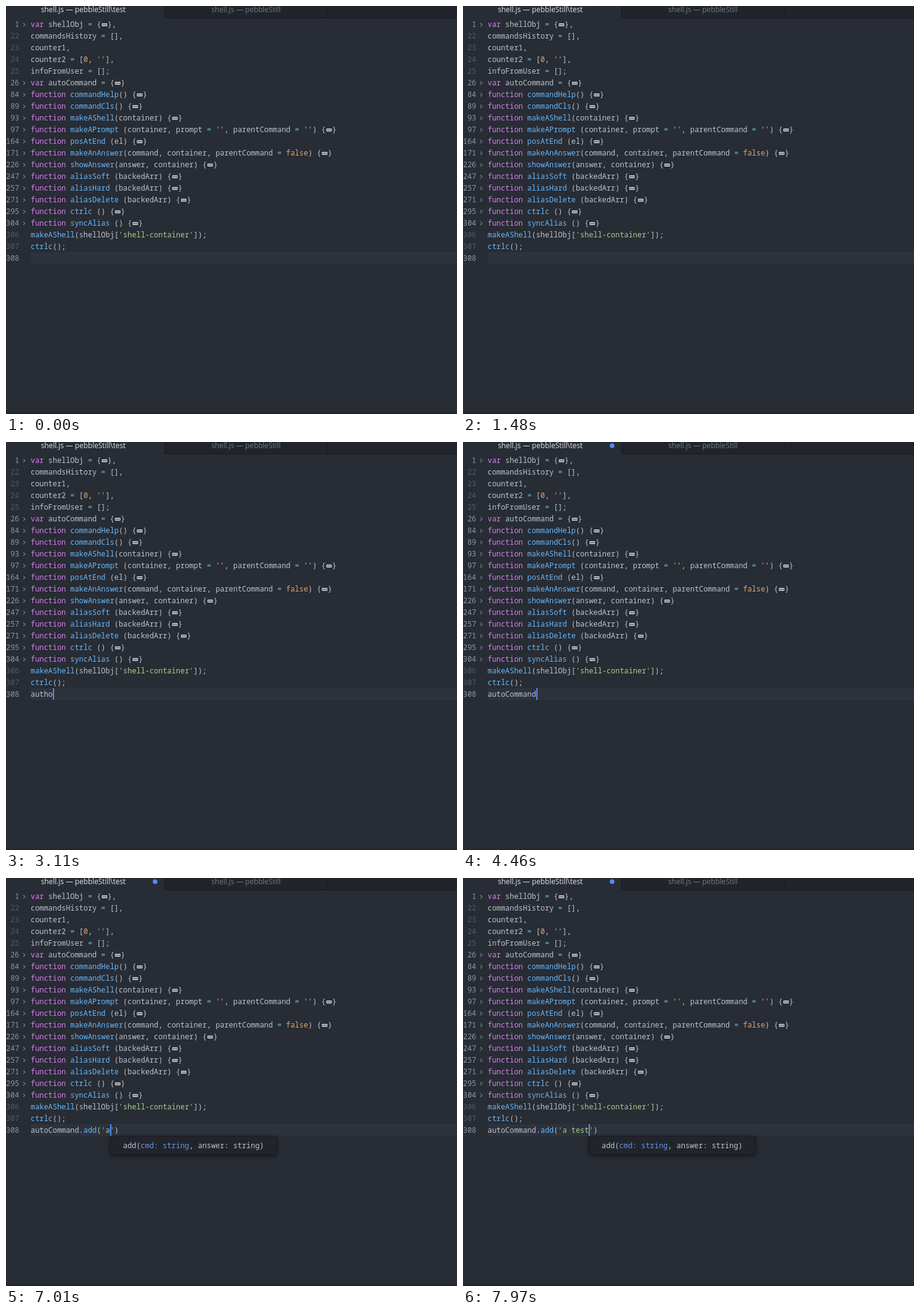
Animation, 732 px wide and 663 px high, one loop 8 s. Source, as an HTML page with a canvas:

```html
<!DOCTYPE html>
<html lang="en">
<head>
<meta charset="utf-8">
<title>Code editor with autocomplete</title>
<style>
  html, body { margin: 0; width: 100%; height: 100%; overflow: hidden; background: #282c34; }
  canvas { display: block; }
</style>
</head>
<body>
<canvas id="stage" width="732" height="663"></canvas>
<script>
const ctx = document.getElementById('stage').getContext('2d');
const LOOP = 8000, LEFT = 40, ROW = 19, FONT = 11.912, CELL = FONT * 0.6;
const MONO = '"Noto Sans Mono", monospace', SANS = '"Open Sans", sans-serif';
const C = {
  bg: '#282c34', panel: '#21252b', edge: '#181a1f', text: '#bcc3d0', dim: '#737a87',
  keyword: '#d480ec', call: '#66b8fb', string: '#a6cf88', value: '#dfa46c',
  operator: '#5cc0cc', property: '#ec6f79', accent: '#568af2'
};

const LINES = [
  [1, 'var shellObj = {…},'],
  [22, 'commandsHistory = [],'],
  [23, 'counter1,'],
  [24, "counter2 = [0, ''],"],
  [25, 'infoFromUser = [];'],
  [26, 'var autoCommand = {…}'],
  [84, 'function commandHelp() {…}'],
  [89, 'function commandCls() {…}'],
  [93, 'function makeAShell(container) {…}'],
  [97, "function makeAPrompt (container, prompt = '', parentCommand = '') {…}"],
  [164, 'function posAtEnd (el) {…}'],
  [171, 'function makeAnAnswer(command, container, parentCommand = false) {…}'],
  [226, 'function showAnswer(answer, container) {…}'],
  [247, 'function aliasSoft (backedArr) {…}'],
  [257, 'function aliasHard (backedArr) {…}'],
  [271, 'function aliasDelete (backedArr) {…}'],
  [295, 'function ctrlc () {…}'],
  [304, 'function syncAlias () {…}'],
  [306, "makeAShell(shellObj['shell-container']);"],
  [307, 'ctrlc();'],
  [308, '']
];

// Text of the last line over time; | is a visible caret, ¦ a blinked-off one.
const TYPING = [
  [0, '¦'], [1510, '|'], [1890, 'a|'], [2050, 'au|'], [2370, 'aut|'], [2490, 'auth|'],
  [2670, 'autho|'], [2850, 'author|'], [3110, 'autho|'], [3300, 'auth|'], [3440, 'aut|'],
  [3670, 'auto|'], [4060, 'auto¦'], [4460, 'autoCommand|'], [4750, 'autoCommand.|'],
  [5060, 'autoCommand.¦'], [5280, 'autoCommand.a|'], [5570, 'autoCommand.ad|'],
  [5730, 'autoCommand.add|'], [6030, 'autoCommand.add(|)'], [6440, 'autoCommand.add(¦)'],
  [6700, "autoCommand.add('|')"], [7010, "autoCommand.add('a|')"],
  [7270, "autoCommand.add('a |')"], [7400, "autoCommand.add('a t|')"],
  [7580, "autoCommand.add('a te|')"], [7820, "autoCommand.add('a tes|')"],
  [7970, "autoCommand.add('a test|')"]
];

// Suggestion rows: kind, left label, word, right label.
const ADD = [['f', '', 'add()'], ['s', '', 'add(cmd: string, answer: string)']];
const ARROW = ['s', '', 'af', 'Arrow Function'];
const GLOBALS = [
  ARROW, ['v', '', 'autoCommand'],
  ['f', '', 'aliasSoft()'], ['s', '', 'aliasSoft(backedArr)'],
  ['f', '', 'aliasHard()'], ['s', '', 'aliasHard(backedArr)'],
  ['f', '', 'aliasDelete()'], ['s', '', 'aliasDelete(backedArr)'],
  ['f', '', 'alert()'], ['v', 'string', 'answer']
];
const VARIABLE = [['v', '', 'autoCommand']];
const MEMBERS = [
  ['p', '?', 'a'], ...ADD,
  ['f', 'bool', 'hasOwnProperty()'], ['s', 'bool', 'hasOwnProperty(prop: string)'],
  ['f', 'bool', 'isPrototypeOf()'], ['s', 'bool', 'isPrototypeOf(obj: ?)'],
  ['f', 'bool', 'propertyIsEnumerable()'],
  ['s', 'bool', 'propertyIsEnumerable(prop: string)'], ['f', 'string', 'toString()']
];
const WORDS = [['s', '', 'timeout', 'setTimeout'], ['s', '', 'typeof'], ['s', '', 'template']];

// Start, rows, column of the word, matched length, width.
const POPUPS = [
  [0], [1940, GLOBALS, 0, 1, 546], [2110, VARIABLE, 0, 2, 243], [2530],
  [3710, VARIABLE, 0, 4, 243], [4460], [4880, MEMBERS, 12, 0, 340],
  [5340, [ARROW, ['p', '?', 'a'], ...ADD], 12, 1, 400],
  [5610, ADD, 12, 2, 276], [5770, ADD, 12, 3, 276], [6110],
  [7070, GLOBALS, 17, 1, 546], [7270], [7640, WORDS, 19, 1, 240], [7870]
];
const KINDS = {
  s: ['#3d4a41', C.string], p: ['#3b4049', C.text], f: ['#2c4058', C.call], v: ['#463a50', C.keyword]
};

const latest = (list, t) => list.findLast(item => item[0] <= t);

function rect(x, y, w, h, color) {
  ctx.fillStyle = color;
  ctx.fillRect(x, y, w, h);
}

function circle(x, y, r, color) {
  ctx.fillStyle = color;
  ctx.beginPath();
  ctx.arc(x, y, r, 0, 7);
  ctx.fill();
}

function sans(text, x, y, color = '#fff', size = 11.6, align = 'left') {
  ctx.font = `${size}px ${SANS}`;
  ctx.textAlign = align;
  ctx.fillStyle = color;
  ctx.fillText(text, x, y);
}

// Draws on a character grid and returns the x after the last cell.
function mono(text, x, y, color, size = FONT, weight = 500) {
  ctx.font = `${weight} ${size}px ${MONO}`;
  ctx.textAlign = 'left';
  ctx.fillStyle = color;
  for (const char of text) {
    ctx.fillText(char, x, y);
    x += size * 0.6;
  }
  return x;
}

function foldMark(x, y) {
  ctx.fillStyle = C.text;
  ctx.beginPath();
  ctx.roundRect(x + 1, y - 6, 9, 5, 1);
  ctx.fill();
  for (let i = 0; i < 3; i++) rect(x + 2.5 + i * 2.4, y - 4.3, 1.4, 1.6, C.bg);
  return x + 10.5;
}

function code(text, y) {
  const token = /(function|var)\b|('[^']*')|(\b\d+\b|false\b)|(\w+(?=\s*\())|((?<=\.)\w+)|(=)|(\w+|.)/g;
  const colors = [C.keyword, C.string, C.value, C.call, C.property, C.operator, C.text];
  let x = LEFT;
  for (const match of text.matchAll(token)) {
    const kind = match.slice(1).findIndex(Boolean);
    x = match[0] === '…' ? foldMark(x, y) : mono(match[0], x, y, colors[kind]);
  }
}

function editor() {
  rect(0, 0, 732, 663, C.bg);
  rect(257, 0, 475, 20, C.panel);
  rect(257, 19, 475, 1, C.edge);
  rect(257, 0, 1, 20, C.edge);
  rect(521, 0, 1, 20, C.edge);
  sans('shell.js — pebbleStill\\test', 125.5, 10, '#e2e5ea', 11.8, 'center');
  sans('shell.js — pebbleStill', 389.5, 10, C.dim, 11.8, 'center');
  rect(LEFT, 400, 692, ROW, '#2d323c');
  LINES.forEach(([number, text], i) => {
    const y = 34 + i * ROW, folded = text.includes('…');
    const bright = folded || number === 308;
    mono(`${number}`, 21.5 - `${number}`.length * CELL, y, bright ? '#8f96a3' : '#515969');
    if (folded) {
      ctx.strokeStyle = C.dim;
      ctx.lineWidth = 1.2;
      ctx.beginPath();
      ctx.moveTo(28, y - 6.5);
      ctx.lineTo(31, y - 3.8);
      ctx.lineTo(28, y - 1);
      ctx.stroke();
    }
    code(text, y);
  });
}

function panel(x, y, w, h) {
  ctx.save();
  ctx.shadowColor = 'rgba(0,0,0,.45)';
  ctx.shadowBlur = 6;
  ctx.shadowOffsetY = 2;
  ctx.fillStyle = C.panel;
  ctx.beginPath();
  ctx.roundRect(x, y, w, h, 3);
  ctx.fill();
  ctx.restore();
}

function kindIcon(kind, x, y) {
  const [back, front] = KINDS[kind];
  rect(x, y, 26, 26, back);
  if (kind !== 's') return mono(kind, x + 9.5, y + 17, front, FONT, 700);
  rect(x + 6.5, y + 11.5, 5, 3, front);
  ctx.beginPath();
  ctx.moveTo(x + 11, y + 8.5);
  ctx.lineTo(x + 16, y + 13);
  ctx.lineTo(x + 11, y + 17.5);
  ctx.fill();
  rect(x + 17, y + 9, 2, 8, front);
}

function popup(rows, column, matched, width) {
  const small = 11, labelSize = Math.max(...rows.map(row => row[1].length));
  const wordX = Math.max(LEFT + column * CELL, labelSize > 5 ? 80 : 0);
  const x = Math.round(wordX - 36 - (labelSize ? labelSize * small * 0.6 + 9.4 : 0));
  panel(x, 419, width, rows.length * 26);
  rows.forEach(([kind, label, word, right], i) => {
    const y = 419 + i * 26, base = y + 17;
    if (!i) rect(x, y, width, 26, '#3a3f4b');
    kindIcon(kind, x, y);
    mono(label, wordX - 7.5 - label.length * small * 0.6, base, C.dim, small);
    const open = word.indexOf('(');
    [...word].forEach((char, k) => {
      const hit = k < matched;
      const hint = open >= 0 && k > open && !'(),'.includes(char);
      const color = hit ? '#fff' : hint ? C.dim : i ? C.text : '#d7dae0';
      mono(char, wordX + k * CELL, base, color, FONT, hit ? 700 : 500);
    });
    if (right) mono(right, x + width - 12 - right.length * small * 0.6, base, '#9199a7', small);
  });
}

function tooltip(caretX) {
  const x = Math.round(caretX);
  panel(x, 419, 271, 31);
  ctx.strokeStyle = C.edge;
  ctx.lineWidth = 1;
  ctx.beginPath();
  ctx.roundRect(x + 0.5, 419.5, 270, 30, 3);
  ctx.stroke();
  let end = mono('add(', x + 21, 439, C.text);
  end = mono('cmd: string', end, 439, '#6494ed');
  mono(', answer: string)', end, 439, C.text);
}

function inside(x, y, w, h, draw) {
  ctx.save();
  ctx.beginPath();
  ctx.rect(x, y, w, h);
  ctx.clip();
  draw();
  ctx.restore();
}

const list = (items, x, y, step, color, size = 3.6) =>
  items.forEach((item, i) => sans(item, x, y + i * step, color, size));

function recorderWindow() {
  rect(214, 108, 24, 16, '#d5d8da');
  sans('PanelToClip', 243, 122);
  rect(214, 133, 194, 8, '#fff');
  rect(214, 313, 194, 9, '#f4f4f4');
  rect(214, 141, 1, 172, '#fff');
  rect(407, 141, 1, 172, '#fff');
  sans('PanelToClip  rec', 217, 139, '#444', 4);
  sans('×', 401, 139, '#555', 4);
  for (let i = 0; i < 9; i++) rect(308 + i * 8, 316, 4, 3, '#b5b5b5');
  rect(379, 316, 4, 4, '#2a6fc0');
  rect(394, 316, 4, 4, '#2b4f8c');
  sans('Pause', 384, 320, '#333', 3.6);
  sans('Stop', 399, 320, '#333', 3.6);
}

function editorWindow() {
  ctx.strokeStyle = '#fff';
  ctx.lineWidth = 2;
  ctx.strokeRect(415, 100, 330, 228);
  circle(432, 117, 12, '#35a878');
  sans('shell.js — pebbleStill\\test — C:\\Users\\parvin tolmaner...', 449, 122);
  inside(420, 133, 312, 194, () => {
    rect(420, 133, 312, 194, C.bg);
    rect(420, 139, 312, 10, C.panel);
    ctx.save();
    ctx.translate(422, 143.5);
    ctx.scale(0.255, 0.255);
    editor();
    ctx.restore();
    rect(420, 133, 312, 8, '#fff');
    sans('File  Edit  View  Selection  Find  Packages  Help', 422, 139, '#555', 3.6);
    rect(420, 315, 312, 9, C.panel);
    sans('+  ▢  ×   shell.js   308:1', 423, 321, '#9da5b4', 3.6);
    sans('CRLF   UTF-8   JavaScript   ⎇ master   0 files', 652, 321, '#9da5b4', 3.6);
  });
}

function filesWindow() {
  rect(135, 342, 12, 19, '#f3d58a');
  rect(138, 345, 10, 15, '#f8e3a8');
  sans('PanelToClip.1.20.4.Portable', 160, 356);
  rect(131, 367, 356, 190, '#fff');
  rect(131, 379, 356, 24, '#f5f6f7');
  rect(131, 373, 15, 6, '#1979ca');
  rect(190, 367, 31, 6, '#f4d4e4');
  sans('File', 134, 378, '#fff', 4);
  sans('Home     Share     View     Application Tools', 149, 378, '#444', 4);
  const tools = ['#b9c3cb', '#bfcbd6', '#a9c4e0', '#f1cf77', '#f1cf77', '#222', '#d5b15b', '#f4d98b', '#8fb3dc', '#92bce6'];
  tools.forEach((color, i) => rect(139 + i * 17 + (i > 2 ? 15 : 0), 382, 5, 7, color));
  list(['Pin  Copy Paste', 'access'], 137, 394, 4, '#555');
  list(['Move  Copy  Delete Rename', 'to       to'], 202, 394, 4, '#555');
  list(['New item', 'Easy access'], 262, 385, 5, '#555');
  list(['Open', 'Edit', 'History'], 309, 385, 5, '#555');
  list(['Select all', 'Select none', 'Invert'], 335, 385, 5, '#555');
  sans('←  →  ↑   › This PC › Downloads › PanelToClip.1.20.4.Portable', 135, 409, '#444', 4);
  rect(131, 411, 356, 1, '#e5e5e5');
  sans('Name                                                    Date modified              Type                          Size', 191, 417, '#555', 4);
  rect(184, 420, 163, 6, '#d6d6d6');
  sans('PanelToClip.exe', 191, 425, '#222', 4);
  sans('11/20/2019  6:02 PM      Application         1,740 KB', 252, 425, '#777', 4);
  rect(131, 514, 48, 6, '#d6d6d6');
  const places = ['Quick access', 'Desktop', 'Downloads', 'Documents', 'Pictures', 'design_notes',
    'formplanner', 'Folding Stone Paper', 'quiz-content', '', '', 'Cloud', 'This PC', '3D Objects',
    'Desktop', 'Documents', 'Downloads', 'Music', 'Pictures', 'Videos', 'Local Disk (C:)', 'Data Disk (D:)'];
  places.forEach((place, i) => {
    if (place) rect(138, 418 + i * 6.05, 4, 3.5, i > 4 && i < 9 ? '#f0cc6c' : '#58a2dc');
    sans(place, 145, 421.7 + i * 6.05, '#333', 3.8);
  });
  rect(178, 412, 5, 140, '#eee');
  rect(408, 412, 1, 140, '#eee');
  sans('No preview available.', 436, 484, '#666', 4);
  sans('1 item     1 item selected  1.70 MB', 135, 556, '#444', 3.8);
  rect(475, 552, 5, 5, '#8bc8be');
}

function projectWindow() {
  circle(511, 351, 12, '#35a878');
  sans('shell.js — C:\\Users\\parvin tolmaneri\\I...', 528, 356);
  inside(499, 367, 233, 190, () => {
    rect(499, 367, 233, 190, C.bg);
    rect(499, 367, 233, 6, '#fff');
    sans('File  Edit  View  Selection  Find  Packages  Help', 503, 372, '#555', 3.6);
    rect(499, 373, 59, 184, C.panel);
    rect(558, 373, 174, 8, C.panel);
    rect(722, 373, 10, 8, C.bg);
    rect(499, 530, 56, 6, '#3a3f4b');
    sans('Project', 522, 379, '#9da5b4', 3.8);
    sans('shell.js', 638, 379, '#9da5b4', 3.8);
    list(['⌄ images', '   alias.png', '   bigger.png', '   clear.png', '   close.png', '   delete.png', '   errors.png',
      '   open.png', '   help.png', '   move.png', '   save.png', '   sync.png', '   zoom.png', '› node_modules',
      '.gitignore', 'help.js', 'index.css', 'index.html', 'index.js', 'LICENSE', 'package-lock.json', 'package.json',
      'README.md', 'server.js', 'shell.js', 'shell-data.json', 'shell-style.css'], 508, 385, 6.1, '#9da5b4');
    const commands = ["'prompt-error-color': 'yellow',", "'command': {", "  'alias -soft': ['aliasSoft', 'prompt', ['command', 'alias']],",
      "  'alias -hard': ['aliasHard', 'prompt', ['command', 'alias', 'arguments']],", "  'alias -delete': ['aliasDelete', 'prompt', ['alias']],",
      "  'cancelCommand': ['cancelled', []],", "  'change bg': ['bgChange', 'prompt', ['color', 'success message']],", "  'cls': ['commandCls', ''],",
      "  'clear': ['commandCls', ''],", "  'config manifest -open': ['configOpen', ''],", "  'config manifest -reload': ['configReload', ''],",
      "  'config manifest -set': ['configSet', 'prompt', ['json file name']],", "  'convert': ['convert', 'prompt', ['from', 'json file name']],",
      "  'create': ['create', 'prompt', ['sort_number', 'type']],", "  'delete': ['cls_delete', 'prompt', ['delete by sort number']],",
      "  'hello': ['Hi', ''],", "  'clicked to refresh a content': ['Content refreshed', ''],", "  'help': ['commandHelp', ''],",
      "  'help --list': ['commandHelp', 'list'],", "  'longtext': ['Lorem ipsum dolor sit amet, consectetur adipiscing'],",
      "  'make page from folder': ['makePageFromFolder', ''],", "  'set folder to save your file': ['setFolder']", '}', '},',
      'commandsHistory = [],', 'counter1,', "counter2 = [0, ''],", 'infoFromUser = [];', '', '', 'var autoCommand = {', '  trie: {', '    nodes: [],'];
    commands.forEach((line, i) => {
      const y = 385.5 + i * 4.95;
      mono(`${i + 3}`, 561, y, '#4b5363', 3.3);
      mono(line, i < 23 ? 576 : 569, y, i < 22 ? C.string : C.text, 3.3);
    });
    rect(499, 550, 233, 7, C.panel);
    sans('+   ▢   ×   shell.js   22:1', 502, 555, '#9da5b4', 3.6);
  });
}

function switcher(alpha) {
  // Layers fade one by one with the same alpha.
  ctx.save();
  ctx.globalAlpha = alpha;
  rect(104, 76, 628, 508, 'rgba(24,24,24,.86)');
  recorderWindow();
  editorWindow();
  filesWindow();
  projectWindow();
  ctx.restore();
}

function draw(t) {
  editor();
  rect(0, 661, 732, 2, C.panel);

  const line = latest(TYPING, t)[1];
  const caret = line.search(/[|¦]/);
  const caretX = LEFT + caret * CELL;
  code(line.replace(/[|¦]/, ''), 414);
  if (t >= 6030 && t < 6700) rect(LEFT + 15 * CELL, 417, CELL * 2, 1, '#528bff');
  if (line.includes('|')) rect(Math.round(caretX), 400, 2, ROW, '#528bff');

  if (t >= 3990) {
    ctx.globalAlpha = Math.min(1, (t - 3970) / 70);
    circle(242, 6, 3.8, C.accent);
    ctx.globalAlpha = 1;
  }

  const [, rows, ...layout] = latest(POPUPS, t);
  if (rows) popup(rows, ...layout);
  else if (t >= 6190) tooltip(caretX);

  const alpha = latest([[0, 0], [1390, 1], [1430, 0.6], [1455, 0.25], [1480, 0]], t)[1];
  if (alpha) switcher(alpha);
}

function frame() {
  draw(performance.now() % LOOP);
  requestAnimationFrame(frame);
}
frame();
</script>
</body>
</html>
```
